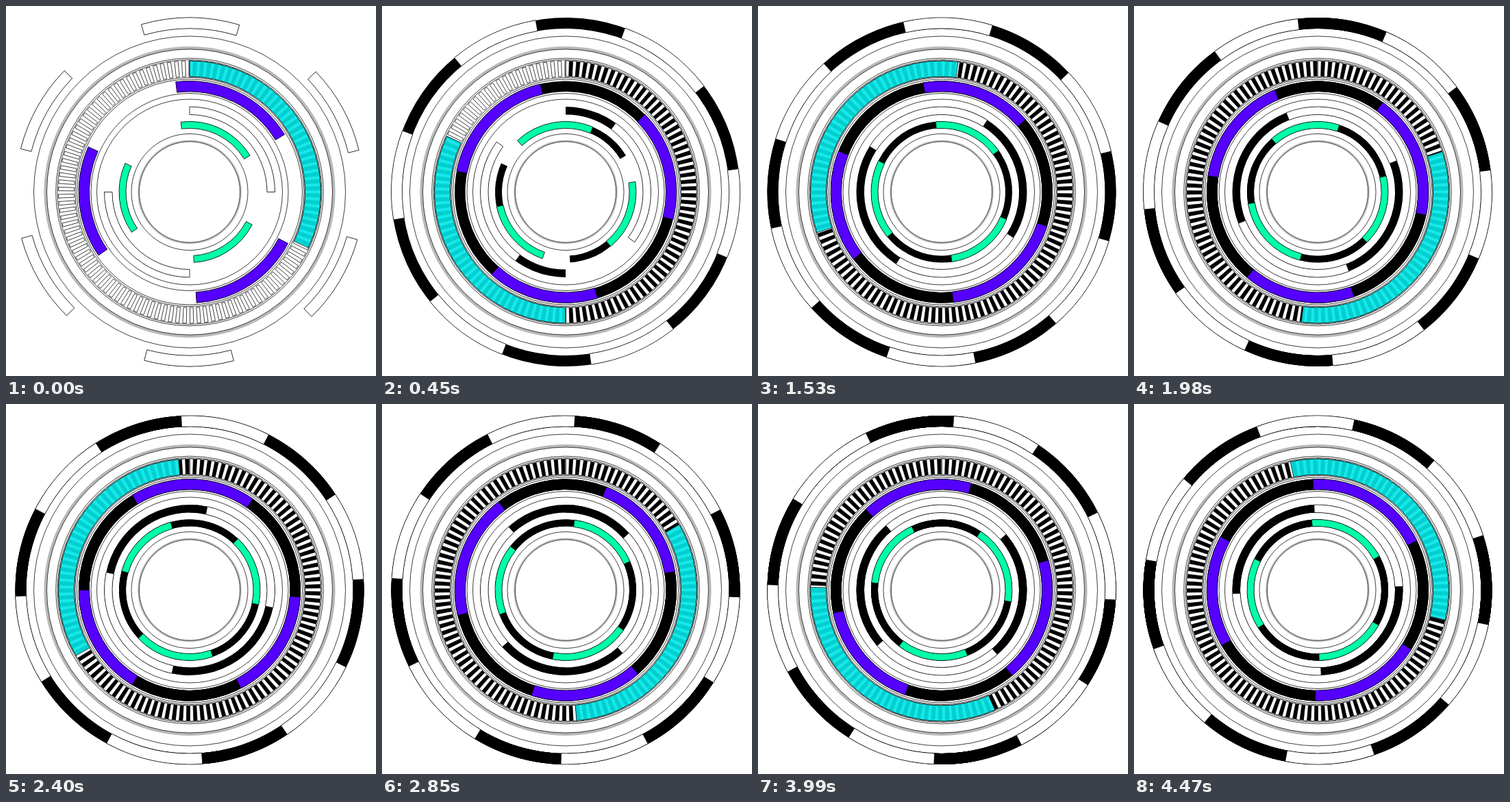
Write an HTML page with a canvas that moves like this. It is 540 by 540 pixels and loops after 4500 ms.

```html
<!DOCTYPE html>
<html lang="en">
<head>
<meta charset="utf-8">
<title>Rotating dial</title>
<style>
  html, body { margin: 0; width: 100%; height: 100%; overflow: hidden; background: #fff; }
  canvas { display: block; width: 540px; height: 540px; }
</style>
</head>
<body>
<canvas id="stage" width="540" height="540"></canvas>
<script>
const ctx = document.getElementById('stage').getContext('2d');
const LOOP = 4500, STEP = 30;
const CX = 268, CY = 271.5;
const HAIRLINE = 0.75;

// Degrees run clockwise from twelve o'clock; `halves` are the degrees
// turned in the first and second half of the loop.
const rings = [
  { outer: 254.5, inner: 238.5, color: '#fff', halves: [180, 178],
    arcs: dashes(-16.1, 32.7, 29.75, 6) },
  { outer: 162, inner: 146.5, color: '#5500ff', halves: [-360, -360],
    arcs: dashes(-7.2, 66, 58.8, 3) },
  { outer: 124.5, inner: 113, color: '#fff', halves: [180, 180],
    arcs: dashes(0, 90, 90, 2) },
  { outer: 103, inner: 93, color: '#00ffaa', halves: [-180, -180],
    arcs: dashes(-7.2, 66, 58.8, 3) }
];

// Ticks are 5px dashes with 5px gaps along the middle of their band.
const ticks = { outer: 191.5, inner: 168.5, span: 115.2, halves: [900, 900] };
const TICK = 5 / 180 * 180 / Math.PI;

// Evenly dashed ring whose first arc is longer than the others.
function dashes(start, first, dash, count) {
  const arcs = [[start, start + first]];
  for (let i = 1; i < count; i++) {
    const from = start + first + dash * (2 * i - 1);
    arcs.push([from, from + dash]);
  }
  return arcs;
}

const rad = deg => (deg - 90) * Math.PI / 180;

function turned({ halves: [first, second] }, progress) {
  return first * Math.min(progress * 2, 1) + second * Math.max(progress * 2 - 1, 0);
}

function sector(outer, inner, from, to) {
  ctx.beginPath();
  ctx.arc(CX, CY, outer, rad(from), rad(to));
  ctx.arc(CX, CY, inner, rad(to), rad(from), true);
  ctx.closePath();
}

function fillSector(ring, from, to, color, outlined = true) {
  sector(ring.outer, ring.inner, from, to);
  ctx.fillStyle = color;
  ctx.fill();
  if (outlined) {
    ctx.strokeStyle = '#000';
    ctx.lineWidth = HAIRLINE;
    ctx.stroke();
  }
}

function circle(r, width = HAIRLINE, color = '#000') {
  ctx.beginPath();
  ctx.arc(CX, CY, r, 0, Math.PI * 2);
  ctx.lineWidth = width;
  ctx.strokeStyle = color;
  ctx.stroke();
}

// Black is left behind wherever a light arc has travelled.
function drawTrail(ring, from, to, angle) {
  const start = from + Math.min(angle, 0);
  const end = to + Math.max(angle, 0);
  fillSector(ring, start, Math.min(end, start + 360), '#000', false);
}

function drawRing(ring, progress) {
  const angle = turned(ring, progress);
  for (const [from, to] of ring.arcs) drawTrail(ring, from, to, angle);
  for (const [from, to] of ring.arcs) {
    fillSector(ring, from + angle, to + angle, ring.color);
  }
}

function drawTicks(progress) {
  const angle = turned(ticks, progress);
  drawTrail(ticks, 0, ticks.span, angle);
  for (let from = 0; from < 360; from += 2 * TICK) {
    fillSector(ticks, from, Math.min(from + TICK, 360), '#fff');
  }
  fillSector(ticks, angle, angle + ticks.span, 'rgba(0,230,230,0.9)');
}

function draw(time) {
  const progress = Math.floor((time % LOOP) / STEP) * STEP / LOOP;
  ctx.fillStyle = '#fff';
  ctx.fillRect(0, 0, 540, 540);

  circle(210.5, 4, '#b8b8b8');
  circle(208.5);
  circle(74.8, 2, '#b8b8b8');
  circle(73.6);
  [227.5, 195.3, 193, 167, 164.5, 144, 135.5, 85].forEach(r => circle(r));

  drawTicks(progress);
  rings.forEach(ring => drawRing(ring, progress));
}

const began = performance.now();
function tick() {
  draw(performance.now() - began);
  requestAnimationFrame(tick);
}
tick();
</script>
</body>
</html>
```
